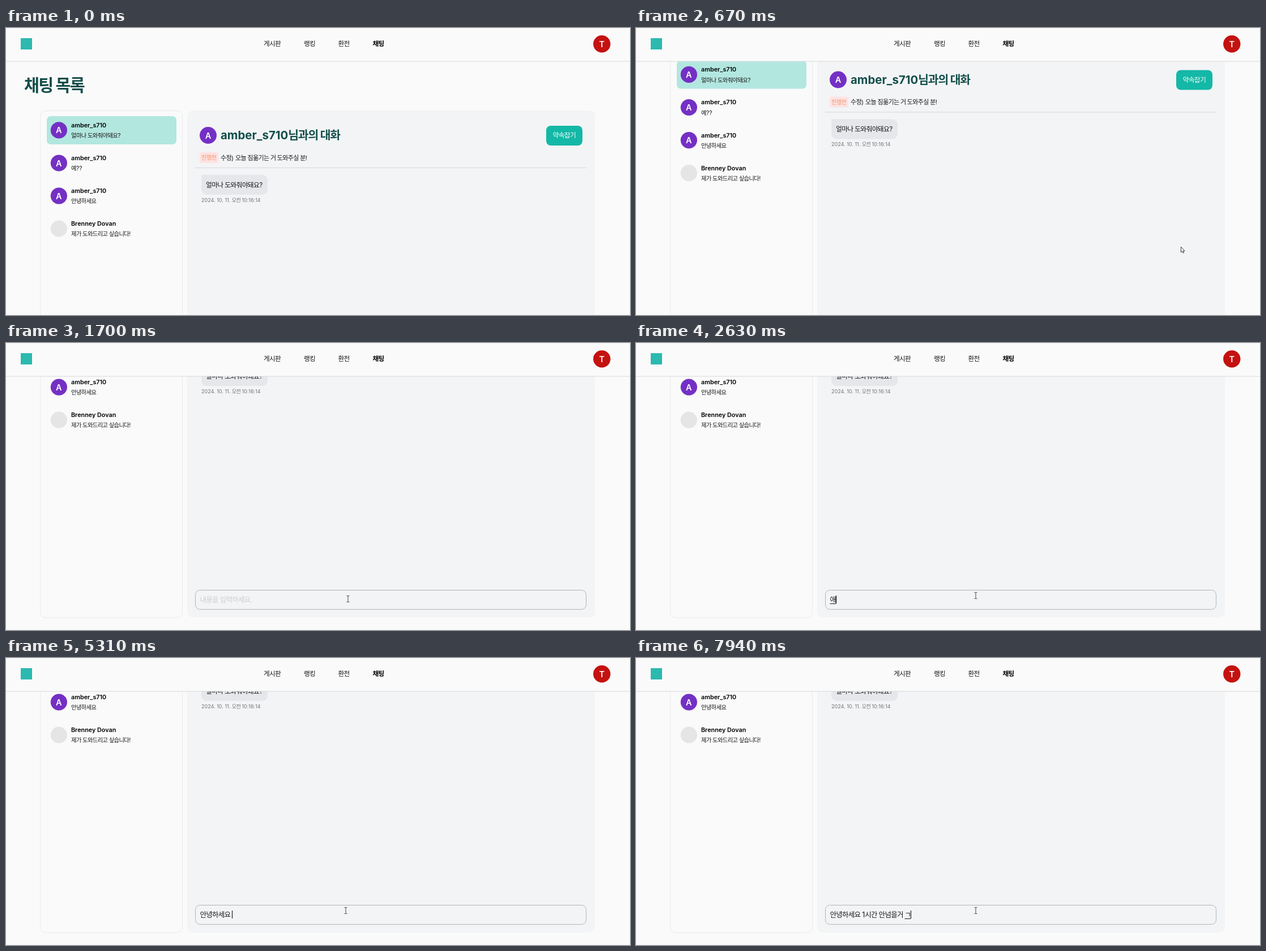
Write an HTML page that moves like this. It is 1102 by 508 pixels and loops after 8 s.

```html
<!DOCTYPE html>
<html lang="ko">
<head>
<meta charset="utf-8">
<style>
html, body { margin: 0; width: 100%; height: 100%; overflow: hidden; background: #fafafa; }
svg { display: block; }
text { font-family: Inter, 'Noto Sans CJK KR', 'Noto Sans CJK', sans-serif; white-space: pre; }
.ko { letter-spacing: -.058em; }
</style>
</head>
<body>
<svg id="stage" width="1102" height="508" viewBox="0 0 1102 508"></svg>
<script>
const LOOP = 8000, TEAL = '#134e4a', INK = '#171717';
const USER = 'amber_s710';

// Hangul runs are set a little tighter than Latin ones
const runs = s => s.replace(/[가-힣ㄱ-ㅣ][가-힣ㄱ-ㅣ ]*/g, '<tspan class="ko">$&</tspan>');
const text = (x, cy, size, s, fill = INK, weight = 400, more = '') =>
  `<text x="${x}" y="${cy + size * .37}" font-size="${size}" fill="${fill}" font-weight="${weight}" ${more}>${runs(s)}</text>`;
const rect = (x, y, w, h, r, fill, more = '') =>
  `<rect x="${x}" y="${y}" width="${w}" height="${h}" rx="${r}" fill="${fill}" ${more}/>`;
const avatar = (x, y, r, fill, letter) =>
  `<circle cx="${x}" cy="${y}" r="${r}" fill="${fill}"/>` +
  text(x, y + .2, 14.5, letter, '#fff', 600, 'text-anchor="middle"');

const chats = [
  [USER, '얼마나 도와줘야돼요?'],
  [USER, '예??'],
  [USER, '안녕하세요'],
  ['Brenney Dovan', '제가 도와드리고 싶습니다!']
];
const chatRow = ([name, msg], i) => {
  const y = 180.9 + i * 58.1;
  return (name === USER ? avatar(93.4, y, 14.6, '#7430c4', 'A') : avatar(93.4, y, 14.6, '#e5e5e5', '')) +
    text(115, y - 9, 10.8, name, '#000', 600) + text(115, y + 9.3, 10.3, msg);
};

stage.innerHTML = `
<g id="page">
  ${text(32, 101, 29.2, '채팅 목록', TEAL, 700)}
  ${rect(60.5, 146.5, 251, 558.5, 9, '#fafafa', 'stroke="#e9eaec"')}
  ${rect(72, 156, 229, 50, 7, '#b2e7e0')}
  ${chats.map(chatRow).join('')}
  ${rect(320, 146, 720, 559, 10, '#f3f4f6')}
  ${avatar(357, 190, 15, '#7430c4', 'A')}
  ${text(379, 189.5, 20.4, USER + '님과의 대화', TEAL, 700)}
  ${rect(954, 173, 64, 35, 8, '#14b8a6')}
  ${text(965.5, 190, 11.8, '약속잡기', '#fff', 500)}
  ${rect(342, 220, 33, 19, 3, '#fee2e2')}
  ${text(345, 229.5, 10.2, '진행전', '#f0946c')}
  ${text(379, 229.5, 11, '수정) 오늘 짐옮기는 거 도와주실 분!')}
  ${rect(334, 247, 691, 1, 0, '#d6d8dc')}
  <path d="M345 260H453a9 9 0 0 1 9 9V286a9 9 0 0 1-9 9H354a9 9 0 0 1-9-9Z" fill="#e5e7eb"/>
  ${text(353, 277.5, 11.8, '얼마나 도와줘야돼요?')}
  ${text(345, 304.5, 9, '2024. 10. 11. 오전 10:16:14', '#737373')}
  ${rect(334.5, 656.5, 690, 34, 8, 'none', 'stroke="#b0b4ba"')}
  ${text(342.5, 673, 12.5, '내용을 입력하세요.', '#cbcdd1', 400, 'id="hint"')}
  ${text(342.5, 673, 12.5, '', INK, 400, 'id="typed"')}
  ${rect(0, 680, 0, 1, 0, INK, 'id="under"')}
  ${rect(0, 666, 1, 14, 0, '#000', 'id="caret"')}
</g>
${rect(0, 0, 1102, 59, 0, '#fafafa')}
${rect(0, 58.5, 1102, 1, 0, '#d9d9d9')}
${rect(26, 18, 20, 20, 0, '#2cb9b0')}
${text(455, 28, 11.67, '게시판')}
${text(526, 28, 11.67, '랭킹')}
${text(586.5, 28, 11.67, '환전')}
${text(647.5, 28, 11.67, '채팅', '#000', 600)}
${avatar(1052.3, 28.2, 15.2, '#c41210', 'T')}
<path id="arrow" d="M.5 .5V10L2.7 8 4.2 11.3 5.7 10.6 4.3 7.4H7Z" fill="#fff" stroke="#222" stroke-width=".9"/>
<path id="beam" d="M-2.5-5.5H-.7L0-5 .7-5.5H2.5M0-5V5M-2.5 5.5H-.7L0 5 .7 5.5H2.5" fill="none" stroke="#444"/>`;

const $ = id => document.getElementById(id);
const [page, hint, typed, under, caret, arrow, beam] =
  ['page', 'hint', 'typed', 'under', 'caret', 'arrow', 'beam'].map($);

// time, value
const scrolling = [[530, 0], [600, 25], [670, 98.5], [740, 180], [810, 219]];
// time, x, y
const mouse = [[390, 1049, 487], [530, 1015, 425], [670, 962, 387], [810, 824, 381.5],
  [950, 668, 397], [1160, 590, 427], [1230, 597, 441], [1440, 604, 449],
  [1700, 604, 453], [1770, 604, 461], [1900, 600, 455], [2100, 600, 447]];
// time, committed text, syllable being composed
const A = '안녕하', B = A + '세요 1', C = B + '시간 ';
const typing = [
  [2630, '', '애'], [2760, '', 'ㅇ'], [2830, '', '아'], [2900, '', '안'], [3030, '안', 'ㄴ'],
  [3180, '안', '녀'], [3250, '안', '녕'], [3380, '안녕', '하'], [3450, A, 'ㅔ'], [3580, A + 'ㅔㅅ', '요'],
  [3780, A + 'ㅔㅅ', 'ㅇ'], [3980, A + 'ㅔㅅ', ''], [4180, A + 'ㅔ', ''],
  [4580, A, ''], [4710, A, 'ㅅ'], [4780, A, '세'], [4910, A, '셍'], [4980, A + '세', '요'],
  [5310, A + '세요 ', ''], [5380, B, ''],
  [5580, B, 'ㅅ'], [5650, B, '시'], [5780, B, '식'], [5910, B + '시', '가'], [5980, B + '시', '간'],
  [6580, C, ''], [6910, C, 'ㅇ'], [6980, C, '아'], [7050, C, '안'],
  [7190, C + '안', 'ㄴ'], [7260, C + '안', '너'], [7330, C + '안', '넘'], [7410, C + '안넘', 'ㅇ'],
  [7490, C + '안넘', '으'], [7570, C + '안넘', '을'], [7650, C + '안넘', '읅'],
  [7730, C + '안넘을', '거'], [7870, C + '안넘을거 ', ''], [7940, C + '안넘을거 ', 'ㄱ']
];

function lerpKeys(keys, t) {
  const i = keys.findIndex(k => k[0] > t);
  if (i < 0) return keys.at(-1).slice(1);
  if (!i) return keys[0].slice(1);
  const a = keys[i - 1], b = keys[i], p = (t - a[0]) / (b[0] - a[0]);
  return a.slice(1).map((v, j) => v + (b[j + 1] - v) * p);
}
const show = (el, on) => el.setAttribute('visibility', on ? 'visible' : 'hidden');

let last;
function setText(line) {
  if (line === last) return;
  last = line;
  const [, done, open] = line || [0, '', ''];
  const width = s => {
    typed.innerHTML = runs(s);
    return s ? typed.getComputedTextLength() : 0;
  };
  const from = width(done), to = width(done + open);
  under.setAttribute('x', 342.5 + from);
  under.setAttribute('width', to - from);
  caret.setAttribute('x', Math.round(342.5 + to));
  show(hint, !line);
}

function draw(t) {
  // movement advances in 70 ms steps while the pointer travels
  const held = t < 390 ? 0 : t < 1440 ? 390 + Math.floor((t - 390) / 70) * 70 :
    mouse.findLast(k => k[0] <= t)[0];
  page.setAttribute('transform', `translate(0 ${-lerpKeys(scrolling, held)[0]})`);

  const [x, y] = lerpKeys(mouse, held), overInput = held > 1160;
  show(arrow, held && !overInput);
  show(beam, overInput);
  (overInput ? beam : arrow).setAttribute('transform', `translate(${x} ${y})`);

  setText(typing.findLast(k => k[0] <= t));
  show(caret, t >= 1770 && !(t >= 2100 && t < 2630) && !(t >= 6510 && t < 6580));
}

const start = performance.now();
function tick() {
  draw((performance.now() - start) % LOOP);
  requestAnimationFrame(tick);
}
tick();
</script>
</body>
</html>
```
